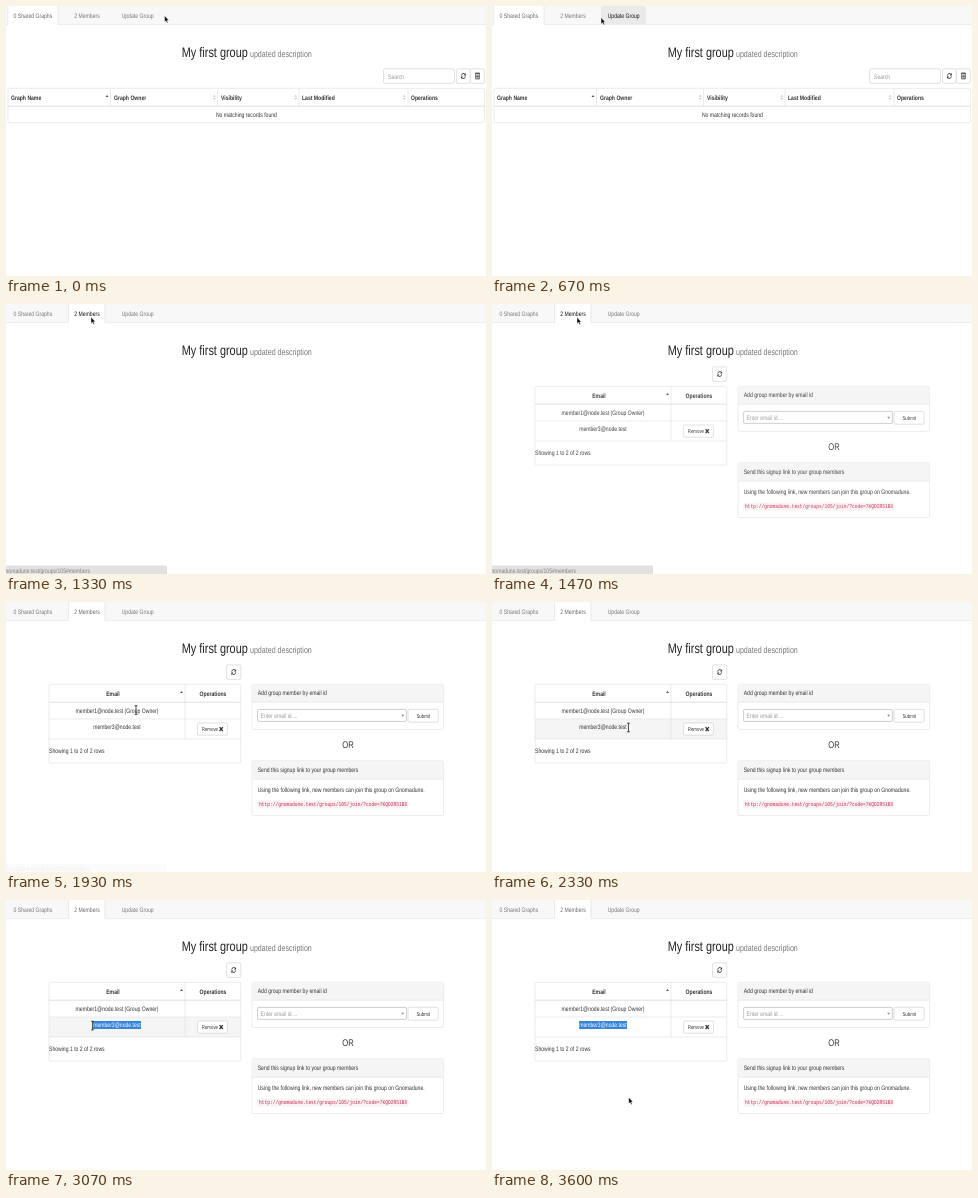
An HTML page that plays this animation: 480 by 270 pixels, repeating every 3.94 s.

```html
<!DOCTYPE html>
<html lang="en">
<head>
<meta charset="utf-8">
<title>Group members</title>
<style>
html, body { margin: 0; width: 100%; height: 100%; overflow: hidden; background: #fff; }
svg { display: block; width: 480px; height: 270px; }
text { font-family: "Liberation Sans", Arial, sans-serif; text-rendering: geometricPrecision; white-space: pre; }
.mono { font-family: "Liberation Mono", monospace; }
</style>
</head>
<body>
<svg id="stage" viewBox="0 0 480 270"></svg>
<script>
// The page is laid out in CSS pixels and shown squeezed: SX across, SY down.
const SX = 0.363, SY = 0.459;
const INK = '#333', GREY = '#777', LINE = '#ddd';

const text = (x, y, str, { size = 14, fill = INK, anchor = 'start', bold, cls = '', id = '' } = {}) =>
  `<text id="${id}" class="${cls}" transform="translate(${x} ${y}) scale(${SX} ${SY})" font-size="${size}"
    fill="${fill}" text-anchor="${anchor}" font-weight="${bold ? 700 : 400}">${str}</text>`;
const mid = (x, y, str, opt) => text(x, y, str, { anchor: 'middle', ...opt });
const box = (x, y, x2, y2, fill = 'none', stroke = 'none', r = 0) =>
  `<rect x="${x}" y="${y}" width="${x2 - x}" height="${y2 - y}" rx="${r}" fill="${fill}" stroke="${stroke}" stroke-width=".6"/>`;
const path = (d, stroke = LINE, width = 0.6, fill = 'none') =>
  `<path d="${d}" stroke="${stroke}" stroke-width="${width}" fill="${fill}"/>`;
const up = (x, y, fill) => path(`M${x - 1.5} ${y}h3l-1.5 -2z`, 'none', 0, fill);
const down = (x, y, fill) => path(`M${x - 1.5} ${y}h3l-1.5 2z`, 'none', 0, fill);
const sorter = x => up(x, 90.8, '#ccc') + down(x, 92, '#ccc');
const button = (x, y, x2, y2) => box(x, y, x2, y2, '#fff', '#ccc', 1.3);
const refresh = (x, y) =>
  path(`M${x - 2} ${y - .4}A2.1 2.5 0 0 1 ${x + 1.6} ${y - 1.7}M${x + 2} ${y + .4}A2.1 2.5 0 0 1 ${x - 1.6} ${y + 1.7}`, INK, 0.9) +
  path(`M${x + 2.4} ${y - 3}v2.6h-2.1zM${x - 2.4} ${y + 3}v-2.6h2.1z`, 'none', 0, INK);
const listIcon = (x, y) =>
  path(`M${x - 2} ${y - 3}h4v6h-4z`, INK, 0.6) +
  path(`M${x - 2} ${y - 2.6}h4M${x - 1.3} ${y - .8}h2.7M${x - 1.3} ${y + .6}h2.7M${x - 1.3} ${y + 2}h2.7`, INK, 0.8);

const tabs = [
  { label: '0 Shared Graphs', x: 7.5, left: 1.8, right: 52 },
  { label: '2 Members', x: 68.3, left: 62.6, right: 99 },
  { label: 'Update Group', x: 115.7, left: 109, right: 154 }
];

const graphsPane = () =>
  box(377.6, 62.9, 448.4, 77.3, '#fff', '#ccc', 1.3) + text(382, 72.5, 'Search', { fill: '#999' }) +
  button(450.6, 62.9, 464.3, 77.3) + button(464.3, 62.9, 478.4, 77.3) +
  refresh(457.4, 70) + listIcon(471.5, 70) +
  box(2, 82.3, 478.4, 116.8, 'none', LINE, 1.3) +
  path('M2 100.2H478.4', LINE, 0.9) +
  path('M104.5 82.3V100M211.5 82.3V100M293 82.3V100M402 82.3V100') +
  [[5, 'Graph Name'], [108, 'Graph Owner'], [215, 'Visibility'], [296, 'Last Modified'], [405, 'Operations']]
    .map(([x, s]) => text(x, 93.6, s, { bold: true })).join('') +
  up(101, 91, '#555') + [208.3, 289.7, 398.3].map(sorter).join('') +
  mid(240.4, 110.8, 'No matching records found');

const email = 'member3@node.test';
const membersPane = () =>
  button(220.6, 62.9, 234.8, 77.3) + refresh(227.7, 70) +
  `<g id="rowHover">${box(43, 117.2, 234.8, 137, '#f5f5f5')}</g>` +
  box(43, 82.3, 234.8, 161, 'none', LINE, 1.3) +
  path('M43 100.2H234.8', LINE, 0.9) + path('M43 117H234.8M43 137H234.8M179 82.3V137') +
  mid(107, 93.6, 'Email', { bold: true }) + mid(207, 93.6, 'Operations', { bold: true }) + up(175.5, 91, '#555') +
  mid(111, 110.8, 'member1@node.test (Group Owner)') +
  mid(111, 127.3, email) +
  `<clipPath id="clip"><rect class="sel" y="121" height="8"/></clipPath>
   <rect class="sel" y="121" height="8" fill="#3584d8"/>
   <g clip-path="url(#clip)">${mid(111, 127.3, email, { fill: '#fff' })}</g>` +
  button(191.6, 121, 221.4, 133.2) + text(195.8, 129.2, 'Remove', { size: 12 }) +
  path('M213.6 125.2l3.2 3.8M216.8 125.2l-3.2 3.8', INK, 1.3) +
  text(43, 151.4, 'Showing 1 to 2 of 2 rows') +

  box(246, 82.3, 437.6, 127.4, '#fff', LINE, 1.3) + box(246.3, 82.6, 437.3, 100, '#f5f5f5') + path('M246 100.2H437.6') +
  text(251.7, 93.4, 'Add group member by email id') +
  box(251.6, 107.4, 400.4, 119.4, '#fff', '#aaa', 1.3) +
  text(254.6, 115.8, 'Enter email id ...', { fill: '#999' }) + down(396.7, 112.8, '#888') +
  button(402, 107.3, 432.2, 120.2) + mid(417.2, 115.8, 'Submit', { size: 12 }) +
  mid(342, 145.8, 'OR', { size: 21 }) +
  box(246, 158.8, 437.6, 213.6, '#fff', LINE, 1.3) + box(246.3, 159.1, 437.3, 177, '#f5f5f5') + path('M246 177.1H437.6') +
  text(251.7, 170, 'Send this signup link to your group members') +
  text(251.7, 190.4, 'Using the following link, new members can join this group on Gnomadune.') +
  box(251.4, 198.4, 402, 206.6, '#f9f2f4', 'none', 1.3) +
  text(253, 204.3, 'http://gnomadune.test/groups/105/join/?code=7KQD2R51BX', { size: 12.6, fill: '#c7254e', cls: 'mono' });

const $ = id => document.getElementById(id);
$('stage').innerHTML =
  box(0, 0, 480, 18.6, '#f8f8f8') + path('M0 18.6H480', '#e4e4e4') + '<g id="tabs"></g>' +
  text(175.8, 51.4, 'My first group', { size: 30, fill: '#222' }) +
  text(244, 51.4, 'updated description', { size: 19.5, fill: GREY }) +
  `<g id="graphs">${graphsPane()}</g><g id="members">${membersPane()}</g>` +
  `<g id="status">${box(-2, 262, 160.5, 272, '#e2e2e2', '#d4d4d4', 1)}
    ${text(-0.5, 269.2, 'nomadune.test/groups/105#members', { fill: '#808080' })}</g>` +
  `<g id="arrow">${path('M0 0V6.4L1.5 5.2L2.5 7.5L3.5 7L2.6 4.8H4.3Z', '#fff', 0.5, '#000')}</g>` +
  `<g id="beam">${path('M-1.4 -4.3H1.4M0 -4.3V4.3M-1.4 4.3H1.4', '#222', 0.8)}</g>`;

// Keys are [time, value, ...], joined by straight lines.
function at(keys, t) {
  const i = keys.findIndex(k => k[0] > t);
  if (i === 0) return keys[0].slice(1);
  if (i < 0) return keys[keys.length - 1].slice(1);
  const a = keys[i - 1], b = keys[i], p = (t - a[0]) / (b[0] - a[0]);
  return a.slice(1).map((v, j) => v + (b[j + 1] - v) * p);
}

const mouse = [
  [270, 158.5, 9.6], [333, 156, 11], [467, 140, 16], [540, 128, 18], [600, 118.5, 15], [667, 109, 11.5],
  [733, 94, 10.5], [800, 85, 11], [1200, 85, 11], [1333, 85, 13], [1470, 85, 13.2],
  [1533, 87, 28], [1667, 103, 60], [1800, 121, 94], [1867, 127, 103], [1933, 130, 108], [2067, 134, 124],
  [2333, 136.5, 125.5], [2467, 136.5, 125.5], [2533, 131, 125.5], [2600, 118, 125.5], [2667, 102.5, 125.7],
  [2800, 92, 125.6], [2933, 87, 125.6], [3000, 87, 125.6], [3067, 86.5, 125.6], [3270, 86.5, 125.6],
  [3333, 92, 134], [3467, 120, 170], [3600, 136.7, 197.2]
];
const statusKeys = [[867, 0], [933, 0.3], [1000, 0.3], [1067, 1], [1733, 1], [1933, 0.12], [2067, 0]];
const graphsKeys = [[1200, 1], [1333, 0]];
const membersKeys = [[1333, 0], [1467, 0.93], [1533, 1]];

function drawTabs(active, x, y) {
  $('tabs').innerHTML = tabs.map((tab, i) => {
    const { left, right } = tab;
    const over = x > left - 0.5 && x < right + 0.5 && y < 18.6;
    const back = i === active
      ? box(left, -1, right, 19, '#fff') + path(`M${left} 0V18.6M${right} 0V18.6`)
      : over ? box(left, 0, right, 18.3, '#eaeaea') : '';
    return back + text(tab.x, 11.9, tab.label, { fill: over ? '#111' : i === active ? '#666' : GREY });
  }).join('');
}

function draw(t) {
  const [x, y] = at(mouse, t);
  drawTabs(t < 1130 ? 0 : 1, x, y);
  $('graphs').setAttribute('opacity', at(graphsKeys, t)[0]);
  $('members').setAttribute('opacity', at(membersKeys, t)[0]);
  $('status').setAttribute('opacity', at(statusKeys, t)[0]);
  $('rowHover').setAttribute('opacity', y > 117 && y < 137 ? 1 : 0);

  // The selection trails the pointer a little.
  const from = t < 2500 ? 135 : t > 2950 ? 87 : Math.min(135, Math.max(87, at(mouse, t - 22)[0]));
  document.querySelectorAll('.sel').forEach(r => {
    r.setAttribute('x', from);
    r.setAttribute('width', 135 - from);
  });

  const typing = y > 104 && y < 131;
  for (const [id, on] of [['arrow', !typing], ['beam', typing]]) {
    $(id).setAttribute('transform', `translate(${x} ${y})`);
    $(id).setAttribute('visibility', on ? 'visible' : 'hidden');
  }
}

// The screen refreshes 15 times a second.
const LOOP = 3940, RATE = 15 / 1000;
let last = -1;
function tick() {
  const step = Math.floor((performance.now() % LOOP + 4) * RATE);
  if (step !== last) draw((last = step) / RATE);
  requestAnimationFrame(tick);
}
tick();
</script>
</body>
</html>
```
